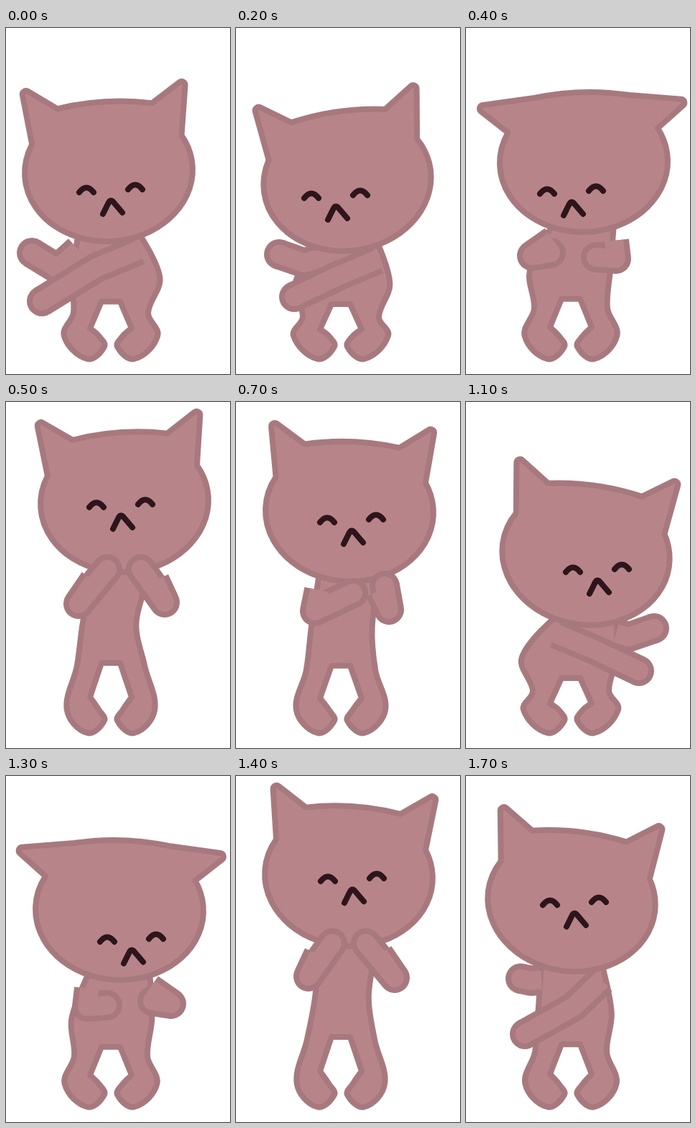
Animation of 312 by 480 pixels, one loop 1800 ms. Source, as an HTML page with a canvas:

```html
<!DOCTYPE html>
<html lang="en">
<head>
<meta charset="utf-8">
<title>Dancing cat</title>
<style>
  html, body { margin: 0; width: 100%; height: 100%; overflow: hidden; background: #fff; }
  canvas { display: block; }
</style>
</head>
<body>
<canvas id="stage" width="312" height="480"></canvas>
<script>
const ctx = document.getElementById('stage').getContext('2d');
const FUR = '#b78589', LINE = '#a7797e', INK = '#2d151b';
const STEP = 100, BEAT = 9;      // two mirrored beats make one loop
const AXIS = 161, FEET_X = 146;
const HEAD_RX = 117, HEAD_RY = 97, EAR_ANGLE = 0.47;
const ARM_WIDTH = 42, OUTLINE = 8;

// head: x, y, tilt, ear droop; face: offset from head; arms: elbow, hand.
const beat = {
  0: { head: [143, 199, -0.06, 0], face: [3, 40], left: [72, 334, 36, 312], right: [125, 333, 50, 379] },
  2: { head: [155, 212, -0.14, 0], face: [-16, 35], left: [95, 326, 60, 314], right: [140, 345, 81, 373] },
  4: { head: [164, 186, -0.03, 1], face: [-17, 55], left: [92, 316, 118, 312], right: [209, 320, 181, 318] },
  5: { head: [165, 139, -0.07, 0], face: [-5, 18], left: [101, 280, 141, 232], right: [221, 278, 188, 232] },
  7: { head: [158, 152, 0.04, 0], face: [3, 26], left: [110, 290, 163, 265], right: [213, 288, 207, 255] },
  8: { head: [175, 174, -0.12, 0], face: [-4, 16], left: [172, 320, 240, 358], right: [232, 284, 246, 281] }
};

const lerp = (a, b, t) => a + (b - a) * t;
const flipArm = arm => arm.map((v, i) => i % 2 ? v : 2 * AXIS - v);

function mirror({ head: [x, y, tilt, droop], face: [dx, dy], left, right }) {
  return { head: [2 * AXIS - x, y, -tilt, droop], face: [-dx, dy], left: flipArm(right), right: flipArm(left) };
}

const keyAt = step => {
  const key = beat[step % BEAT];
  return key && Math.floor(step / BEAT) % 2 ? mirror(key) : key;
};

function poseAt(step) {
  if (keyAt(step)) return keyAt(step);
  const a = keyAt(step - 1), b = keyAt(step + 1), mid = {};
  for (const part in a) mid[part] = a[part].map((v, i) => lerp(v, b[part][i], 0.5));
  return mid;
}

// Smooth open curve; corners and ends get no tangent.
function curve(pts, corners) {
  const path = new Path2D(), last = pts.length - 1;
  const tangent = i => {
    if (i === 0 || i === last || corners.includes(i)) return [0, 0];
    const dx = pts[i + 1][0] - pts[i - 1][0], dy = pts[i + 1][1] - pts[i - 1][1];
    const d = Math.hypot(dx, dy);
    return [dx / d, dy / d];
  };
  path.moveTo(...pts[0]);
  for (let i = 0; i < last; i++) {
    const p = pts[i], q = pts[i + 1], t = tangent(i), u = tangent(i + 1);
    const h = Math.hypot(q[0] - p[0], q[1] - p[1]) / 3;
    path.bezierCurveTo(p[0] + t[0] * h, p[1] + t[1] * h, q[0] - u[0] * h, q[1] - u[1] * h, ...q);
  }
  return path;
}

function shape(path) {
  ctx.fillStyle = FUR;
  ctx.strokeStyle = LINE;
  ctx.lineWidth = OUTLINE;
  ctx.fill(path);
  ctx.stroke(path);
}

// The feet stay planted; hips and knees spread as the head comes down.
function drawBody(x, chin) {
  const crouch = Math.min(1, Math.max(0, (chin - 237) / 75));
  const bend = (low, high) => lerp(low, high, crouch);
  const sway = (AXIS - x) * 0.4;
  const half = side => [
    [x + side * 42, chin - 15],
    [FEET_X + sway + side * bend(36, 66), bend(302, 355)],
    [FEET_X + side * bend(47, 53), bend(365, 401)],
    [FEET_X + side * bend(61, 66), 427],
    [FEET_X + side * 33, 459],
    [FEET_X + side * 9, 442],
    [FEET_X + side * 16, 428],
    [FEET_X + side * 29, bend(409, 418)],
    [FEET_X + side * 13, bend(361, 383)]
  ];
  shape(curve([...half(-1), ...half(1).reverse()], [7, 8, 9, 10]));
}

function drawArm(x, chin, side, [ex, ey, hx, hy]) {
  ctx.lineCap = 'butt';
  for (const [color, width] of [[LINE, ARM_WIDTH], [FUR, ARM_WIDTH - 2 * OUTLINE]]) {
    ctx.strokeStyle = ctx.fillStyle = color;
    ctx.lineWidth = width;
    ctx.beginPath();
    ctx.moveTo(x + side * 42, chin + 8);
    ctx.lineTo(ex, ey);
    ctx.lineTo(hx, hy);
    ctx.stroke();
    ctx.beginPath();
    ctx.arc(hx, hy, width / 2, 0, 7);
    ctx.fill();
  }
  ctx.lineCap = 'round';
}

function drawHead([x, y, tilt, droop]) {
  const earX = 115 + 35 * droop, earY = -124 + 42 * droop;
  const baseX = HEAD_RX * Math.cos(EAR_ANGLE), baseY = -HEAD_RY * Math.sin(EAR_ANGLE);
  const path = new Path2D();
  path.moveTo(-66, -91);
  path.quadraticCurveTo(0, -103, 66, -91);
  path.arcTo(earX, earY, baseX, baseY, 5);
  path.ellipse(0, 0, HEAD_RX, HEAD_RY, 0, -EAR_ANGLE, Math.PI + EAR_ANGLE);
  path.arcTo(-earX, earY, -66, -91, 5);
  path.closePath();
  ctx.save();
  ctx.translate(x, y);
  ctx.rotate(tilt);
  shape(path);
  ctx.restore();
}

function drawFace(x, y) {
  ctx.save();
  ctx.translate(x, y);
  ctx.strokeStyle = INK;
  ctx.lineWidth = OUTLINE;
  ctx.stroke(new Path2D('M-11 19L-3 3Q0-2 4 3L16 17'));
  for (const [ex, ey] of [[-34, -14], [34, -18]])
    ctx.stroke(new Path2D(`M${ex - 10} ${ey + 3}q10-13 20 0`));
  ctx.restore();
}

function draw(step) {
  const { head, face, left, right } = poseAt(step);
  const [x, y] = head, chin = y + 101;
  const arms = [() => drawArm(x, chin, -1, left), () => drawArm(x, chin, 1, right)];
  if (step >= 5 && step < 14) arms.reverse();
  const handsUp = step % BEAT >= 5 && step % BEAT <= 7;

  ctx.fillStyle = '#fff';
  ctx.fillRect(0, 0, 312, 480);
  ctx.lineJoin = ctx.lineCap = 'round';
  drawBody(x, chin);
  if (handsUp) drawHead(head);
  arms.forEach(arm => arm());
  if (!handsUp) drawHead(head);
  drawFace(x + face[0], y + face[1]);
}

function tick() {
  draw(Math.floor(performance.now() / STEP) % (2 * BEAT));
  requestAnimationFrame(tick);
}
tick();
</script>
</body>
</html>
```
